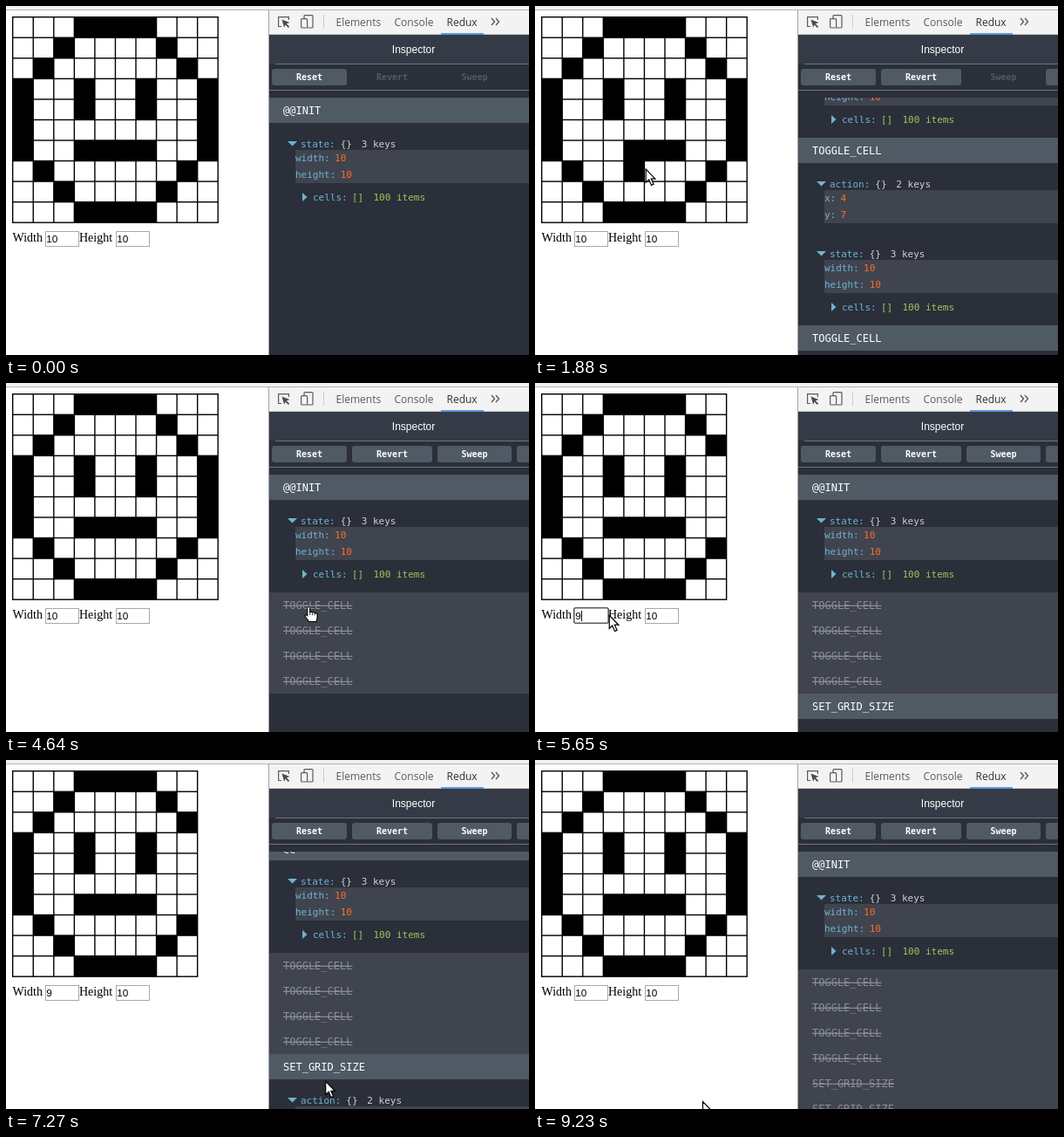
An HTML page for the animation above (9.26 s loop, 600 by 400 pixels).

```html
<!DOCTYPE html>
<html lang="en">
<head>
<meta charset="utf-8">
<title>Grid inspector</title>
<style>
html, body { margin: 0; width: 100%; height: 100%; overflow: hidden; background: #fff; }
svg { display: block; width: 600px; height: 400px; }
.mono { font-family: "DejaVu Sans Mono", monospace; }
.tab { font: 12px "Open Sans", "Noto Sans", sans-serif; fill: #5a5a5a; }
.label { font: 14px "Liberation Serif", serif; }
.field { font: 11.8px "Liberation Sans", sans-serif; }
.btn { font-size: 10px; font-weight: bold; text-anchor: middle; }
.head { font-size: 12px; fill: #fff; }
.off { font-size: 12px; fill: #8b8f96; text-decoration: line-through; }
.tree { font-size: 11px; }
</style>
</head>
<body>
<svg viewBox="0 0 600 400" xmlns="http://www.w3.org/2000/svg">
  <defs><clipPath id="view"><rect x="302" y="105" width="298" height="295"/></clipPath></defs>
  <rect width="600" height="400" fill="#fff"/>
  <rect width="600" height="4" fill="#f2f2f2"/>
  <rect y="4" width="600" height="1" fill="#b4b4b4"/>
  <g id="page"></g>

  <rect x="301" y="5" width="1" height="395" fill="#a3a3a3"/>
  <rect x="302" y="5" width="298" height="27" fill="#f3f3f3"/>
  <rect x="302" y="32" width="298" height="368" fill="#2a2f3a"/>
  <rect x="302" y="32" width="298" height="1" fill="#c4c6c9"/>
  <rect x="499" y="31" width="49" height="2" fill="#5a97e0"/>
  <g fill="none" stroke="#5a5a5a" stroke-width="1.2">
    <path d="M316 23.5H312.6V12.6H324.4V16"/>
    <path d="M342 14V11.5Q342 10.6 343 10.6H351Q352 10.6 352 11.5V24Q352 25 351 25H346"/>
    <rect x="338.6" y="14.6" width="7" height="10.4" rx="1"/>
    <path d="M557 14L560.5 18L557 22M562 14L565.5 18L562 22" stroke-width="1.4"/>
  </g>
  <path d="M316.5 15.5L325.5 19L321.8 20.3L325.2 23.7L323.9 25L320.5 21.6L319.2 24.8Z" fill="#4a4a4a"/>
  <rect x="364" y="10" width="1" height="16" fill="#ccc"/>
  <g class="tab">
    <text x="378.5" y="23">Elements</text>
    <text x="445.5" y="23">Console</text>
    <text x="505.5" y="23" style="fill:#333">Redux</text>
  </g>
  <rect x="302" y="33" width="298" height="33" fill="#353b46"/>
  <text x="467.5" y="54" text-anchor="middle" fill="#fff" style="font:12px 'Liberation Sans',sans-serif">Inspector</text>
  <rect x="309" y="66" width="291" height="1" fill="#6c747e"/>
  <rect x="302" y="96" width="298" height="1" fill="#6c747e"/>
  <g id="bar" class="mono"></g>
  <g id="log" class="mono" clip-path="url(#view)"></g>
  <g id="cursor"></g>
</svg>
<script>
const LOOP = 9260, VIEW = 476, TOP = 105;
const $ = id => document.getElementById(id);

const FACE = ['3456', '27', '18', '0369', '0369', '09', '034569', '18', '27', '3456'];

// on/off: when the log shows the change; gridOn/gridOff: when the board does
const toggle = (x, y, on, off, gridOn = on, gridOff = off) =>
  ({ name: 'TOGGLE_CELL', args: { x, y }, on, off, gridOn, gridOff, w: 10, h: 10, cells: 100 });
const resize = (width, height, cells, on, off) =>
  ({ name: 'SET_GRID_SIZE', args: { width, height }, on, off, gridOn: on, gridOff: off, w: width, h: height, cells });
const ITEMS = [
  { name: '@@INIT', on: 0, off: LOOP, gridOn: 0, gridOff: LOOP, w: 10, h: 10, cells: 100 },
  toggle(3, 6, 900, 4640),
  toggle(4, 7, 1390, 4070),
  toggle(5, 7, 1880, 3610, 1920, 3570),
  toggle(6, 6, 2450, 3110),
  resize(9, 10, 91, 5490, 8030),
  resize(9, 9, 82, 6180, 7110)
];

// start, end, target x, y, optional bend x, y
const START = [52, 361];
const MOVES = [
  [130, 730, 92, 173, 176, 240],
  [900, 1220, 112, 184],
  [1390, 1670, 126, 187],
  [1880, 2280, 157, 169],
  [2450, 2940, 365, 371],
  [3110, 3390, 355, 357],
  [3570, 3770, 353, 323],
  [4070, 4470, 350, 257],
  [4640, 5320, 62, 266],
  [5490, 6010, 140, 265],
  [6180, 7020, 366, 372, 241, 332],
  [7110, 7770, 367, 350],
  [8030, 9230, 192, 391]
];

const rect = (x, y, w, h, fill, more = '') =>
  `<rect x="${x}" y="${y}" width="${w}" height="${h}" fill="${fill}" ${more}/>`;
const text = (x, y, cls, str, fill) =>
  `<text x="${x}" y="${y}" class="${cls}"${fill ? ` fill="${fill}"` : ''}>${str}</text>`;

function boardAt(t) {
  const live = ITEMS.filter(i => t >= i.gridOn && t < i.gridOff);
  const { w, h } = live[live.length - 1];
  const flipped = (x, y) => live.some(i => i.args && i.args.x === x && i.args.y === y);
  return { w, h, dark: (x, y) => FACE[y].includes(x) !== flipped(x, y) };
}

function field(x, y, value, focus) {
  const frame = focus
    ? `<rect x="${x - .2}" y="${y - .2}" width="39.4" height="17.4" rx="2" fill="#fff" stroke="#5c5c5c" stroke-width="1.6"/>`
    : `<rect x="${x + .5}" y="${y + .5}" width="38" height="17" fill="#fff" stroke="#a9a9a9"/>`;
  const caret = focus ? rect(x + 1.5 + 6.56 * String(value).length, y + 3, 1, 12, '#000') : '';
  return frame + text(x + 1.2, y + 13, 'field', value) + caret;
}

function drawPage(t, board) {
  const p = 23.55, line = 1.4, { w, h } = board;
  let out = rect(7, 12, w * p + line, h * p + line, '#000');
  for (let y = 0; y < h; y++)
    for (let x = 0; x < w; x++)
      if (!board.dark(x, y)) out += rect(7 + x * p + line, 12 + y * p + line, p - line, p - line, '#fff');
  const top = Math.round(22.5 + h * p);
  out += text(7.5, top + 12, 'label', 'Width') + text(84, top + 12, 'label', 'Height');
  out += field(45, top, w, t >= 5280 && t < 5970) + field(126, top, h, t >= 5970 && t < 7110);
  $('page').innerHTML = out;
  return top;
}

function drawBar(t) {
  const button = (x, w, name, on) =>
    (on ? rect(x, 72, w, 19, '#4f5a65', 'rx="3"') : '') +
    text(x + w / 2, 85, 'btn', name, on ? '#fff' : '#4f5a65');
  $('bar').innerHTML = button(305, 86, 'Reset', true) + button(397, 92, 'Revert', t >= 900) +
    button(495, 85, 'Sweep', t >= 3110) + button(586, 92, 'Commit', t >= 900);
}

// One expanded object: title row, then number rows on a lighter band
function tree(y, name, keys, values) {
  const end = 338 + 6.62 * (name.length + 1);
  let out = `<path d="M323 ${y + 50}h11l-5.5 5.5z" fill="#6fb3d2"/>` +
    text(338, y + 57, 'tree', name + ':', '#6fb3d2') +
    text(end + 6, y + 57, 'tree', '{}', '#d0d0d0') +
    text(end + 30, y + 57, 'tree', keys + ' keys', '#d0d0d0') +
    rect(332, y + 60, 268, 38, '#40444e');
  Object.entries(values).forEach(([key, value], i) => {
    const base = y + 73 + 19 * i;
    out += text(332, base, 'tree', key + ':', '#6fb3d2') +
      text(337.3 + 6.62 * (key.length + 1), base, 'tree', value, '#fc6d24');
  });
  return out;
}

function drawLog(t) {
  const rows = ITEMS.filter(i => t >= i.on);
  const height = i => t >= i.off ? 29 : i.args ? 215 : 135;
  const total = rows.reduce((sum, i) => sum + height(i), 0);
  let y = TOP - Math.max(0, total - VIEW), out = '';
  const heads = [];
  for (const i of rows) {
    const off = t >= i.off;
    heads.push(y);
    out += rect(302, y, 298, 29, off ? '#40444e' : '#4f5a65') + text(318, y + 19, off ? 'off' : 'head', i.name);
    if (!off) {
      if (i.args) out += tree(y, 'action', 2, i.args);
      const s = i.args ? y + 80 : y;
      out += tree(s, 'state', 3, { width: i.w, height: i.h }) +
        `<path d="M340 ${s + 109}v10l5.5 -5z" fill="#6fb3d2"/>` +
        text(352, s + 118, 'tree', 'cells:', '#6fb3d2') +
        text(397, s + 118, 'tree', '[]', '#a1c659') +
        text(421.5, s + 118, 'tree', i.cells + ' items', '#a1c659');
    }
    y += height(i);
  }
  $('log').innerHTML = out;
  return heads;
}

function pointerAt(t) {
  let [x, y] = START;
  for (const [a, b, tx, ty, bx = (x + tx) / 2, by = (y + ty) / 2] of MOVES) {
    if (t < a) break;
    const n = Math.round((b - a) / 40);
    const u = (Math.min(n, Math.floor((t - a) / 40)) + 1) / (n + 1);
    const e = u * u * (3 - 2 * u), d = 1 - e;
    x = d * d * x + 2 * d * e * bx + e * e * tx;
    y = d * d * y + 2 * d * e * by + e * e * ty;
    if (u < 1) break;
  }
  return [x, y];
}

const SHAPES = {
  arrow: '<path d="M.5 .5V15.6L4 12.4L6.8 18.8L9.4 17.7L6.6 11.5H11.2Z" fill="#fff" stroke="#000" stroke-width="1.2"/>',
  hand: '<path d="M-1.6 9.5V.8Q-1.6 -.6 -.2 -.6Q1.2 -.6 1.2 .8V5.6Q2.6 4.6 4 6Q5.6 5.2 6.7 6.7Q9.6 6 9.6 8.6V12Q9.6 14 8.4 16.4H.2Q-2 13.4 -4.2 10.4Q-4.9 8.9 -3.4 8.6Q-2.4 8.6 -1.6 9.5Z" fill="#fff" stroke="#000" stroke-width="1.1"/><path d="M1.4 6V9M4.1 6.5V9M6.8 7V9.2" stroke="#000" stroke-width=".8"/>',
  beam: '<path d="M-3 -7.5H-1L0 -6.5L1 -7.5H3M0 -6.5V6.5M-3 7.5H-1L0 6.5L1 7.5H3" fill="none" stroke="#000" stroke-width="1.1"/>'
};

function drawCursor(t, fieldTop, heads) {
  if (t < 130) { $('cursor').innerHTML = ''; return; }
  const [x, y] = pointerAt(t);
  const onHead = x > 302 && y > TOP && heads.some(h => y >= h && y < h + 29);
  const onField = y >= fieldTop && y <= fieldTop + 18 && ((x >= 45 && x <= 84) || (x >= 126 && x <= 165));
  $('cursor').setAttribute('transform', `translate(${x} ${y})`);
  $('cursor').innerHTML = SHAPES[onHead ? 'hand' : onField ? 'beam' : 'arrow'];
}

function draw(t) {
  const top = drawPage(t, boardAt(t));
  drawBar(t);
  drawCursor(t, top, drawLog(t));
}

const begin = performance.now();
let last = -1;
function tick() {
  const t = Math.floor(((performance.now() - begin) % LOOP) / 10) * 10;
  if (t !== last) draw(last = t);
  requestAnimationFrame(tick);
}
tick();
</script>
</body>
</html>
```
